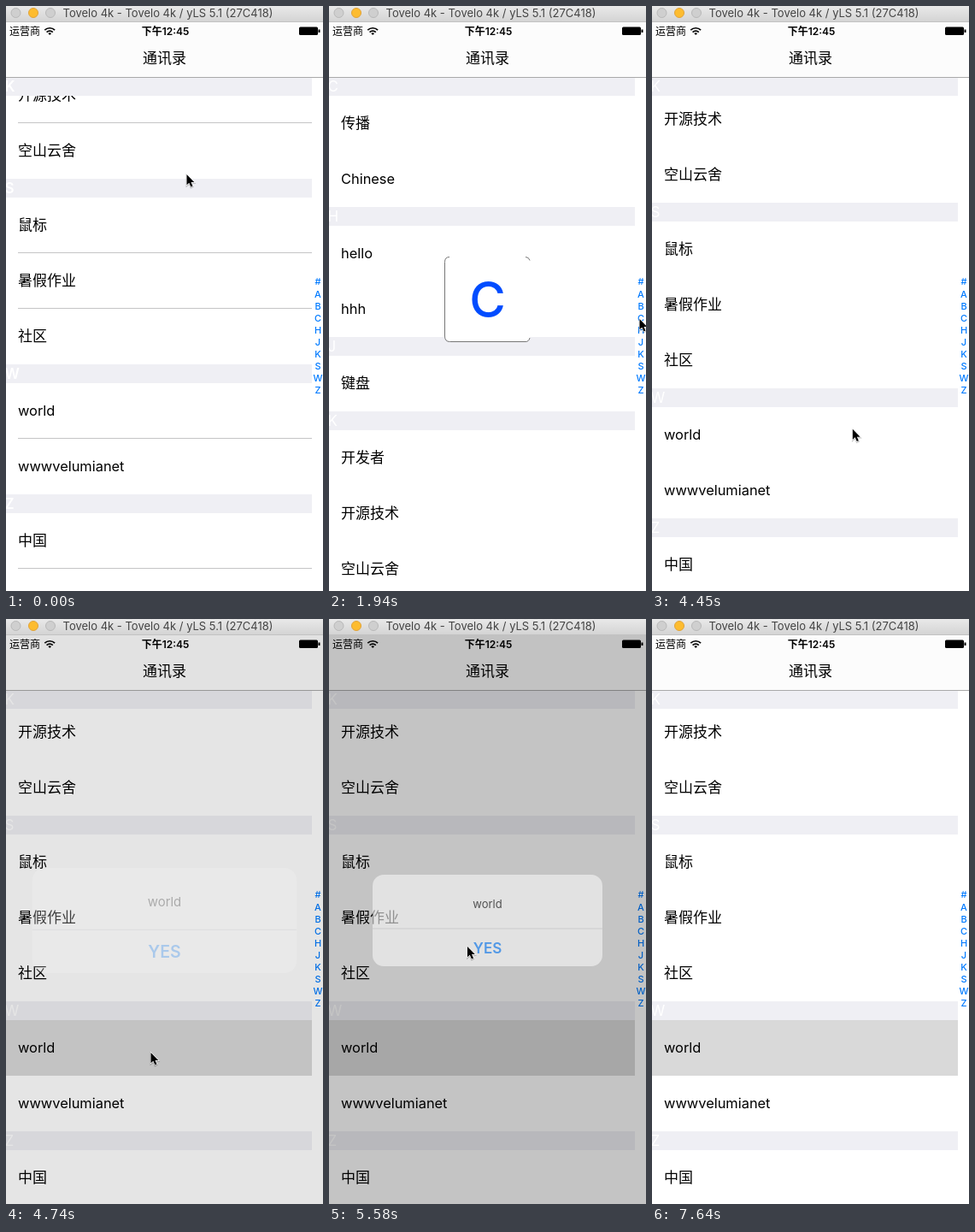
An HTML page that plays this animation: 371 by 684 pixels, repeating every 7.92 s.

```html
<!DOCTYPE html>
<html lang="zh-CN">
<head>
<meta charset="utf-8">
<style>
html, body { margin: 0; width: 100%; height: 100%; overflow: hidden; background: #fff; }
svg { display: block; }
text { font-family: Inter, "Noto Sans CJK SC", "Noto Sans CJK", sans-serif; font-size: 17px; }
.mid { text-anchor: middle; }
.latin { font-size: 16.4px; }
.head rect { fill: #efeff4; }
.head text { fill: #fff; }
.lines { stroke: #c4c4c6; }
.index text { font-size: 11px; font-weight: 500; fill: #007aff; }
</style>
</head>
<body>
<svg width="371" height="684" viewBox="0 0 371 684">
  <defs>
    <linearGradient id="bar" x2="0" y2="1">
      <stop stop-color="#e9e9e9"/><stop offset="1" stop-color="#d4d4d4"/>
    </linearGradient>
    <clipPath id="view"><rect y="83" width="358" height="601"/></clipPath>
  </defs>
  <rect width="371" height="684" fill="#fff"/>
  <g clip-path="url(#view)">
    <g id="rows"></g>
    <g id="heads"></g>
  </g>
  <g class="index mid" id="index"></g>

  <rect y="18" width="371" height="65" fill="#fcfcfc"/>
  <path d="M0 83.5H371" stroke="#a9a9a9"/>
  <text x="4" y="33.5" style="font-size:12px">运营商</text>
  <g fill="none" stroke="#000" stroke-width="1.7">
    <path d="M45.3 28.2a8.3 8.3 0 0 1 11.8 0M47.6 30.6a5 5 0 0 1 7.2 0"/>
    <path d="M51.2 34l-1.9-1.9a2.7 2.7 0 0 1 3.8 0z" fill="#000" stroke="none"/>
  </g>
  <text class="mid" x="186.5" y="33.5" style="font-size:12px;font-weight:600">下午12:45</text>
  <rect x="343" y="24.5" width="22" height="9.5" rx="1.5"/>
  <path d="M365.5 27.5h2v3.5h-2z"/>
  <text class="mid" x="185.5" y="67" style="font-weight:500">通讯录</text>

  <g id="popup">
    <rect x="135.5" y="293" width="100" height="99.5" rx="6" fill="#fff"/>
    <path d="M141 293.5q-5.5 0-5.5 6V386q0 6.5 6 6.5H230q4 0 5-4.5M230 293.5q4 0 5 4" fill="none" stroke="#777"/>
    <text class="mid" id="letter" x="185.5" y="364" style="font-size:58px;font-weight:500" fill="#004cff"></text>
  </g>

  <rect id="dim" y="18" width="371" height="666"/>
  <g id="alert">
    <rect x="-134.5" y="-53.5" width="269" height="107" rx="13" fill="#f8f8f8"/>
    <path d="M-134.5 9.5H134.5" stroke="#d0d0d3"/>
    <text class="mid" y="-14.5" style="font-size:13px">world</text>
    <text class="mid" y="38" style="font-weight:600" fill="#007aff">YES</text>
  </g>

  <rect width="371" height="18" fill="url(#bar)"/>
  <path d="M0 18.5H371" stroke="#c2c2c2"/>
  <g fill="#cfcfcf" stroke="#b9b9b9">
    <circle cx="11.5" cy="8" r="5.5"/>
    <circle cx="32" cy="8" r="5.5" fill="#fdbc2f" stroke="#e0a33a"/>
    <circle cx="52" cy="8" r="5.5"/>
  </g>
  <text x="66.5" y="12.5" style="font-size:13px" fill="#444">Tovelo 4k - Tovelo 4k / yLS 5.1 (27C418)</text>

  <g id="cursor">
    <g transform="translate(-.5 0) scale(.88)">
      <path d="M0 1V15L3.2 12 5.6 17.4 8 16.3 5.7 11.2H10Z" opacity=".25" stroke="#000" stroke-width="2"/>
      <path d="M0 0V14L3.2 11 5.6 16.4 8 15.3 5.7 10.2H10Z" stroke="#fff" stroke-width="1.5" paint-order="stroke"/>
    </g>
  </g>
</svg>
<script>
const $ = id => document.getElementById(id);
const LOOP = 7920, STEP = 146.5, LAST = 52;
const TOP = 83, ROW = 65, HEAD = 22, VIEW = 603;
const sections = [
  ['#', '123'], ['A', '安静'], ['B', '本子'],
  ['C', '传播', 'Chinese'], ['H', 'hello', 'hhh'], ['J', '键盘'],
  ['K', '开发者', '开源技术', '空山云舍'],
  ['S', '鼠标', '暑假作业', '社区'],
  ['W', 'world', 'wwwvelumianet'], ['Z', '中国']
];

// Lay the list out once; scrolling only moves the groups.
let total = 0, rows = '', lines = '', heads = '', index = '';
const tops = sections.map(([name, ...items], s) => {
  const top = total;
  heads += `<g class="head"><rect width="358" height="${HEAD}"/><text x="-1.5" y="17">${name}</text></g>`;
  index += `<text x="365" y="${(s ? 323 + s * 14 : 322) + 4}">${name}</text>`;
  total += HEAD;
  items.forEach((item, i) => {
    if (item === 'world') rows += `<rect id="picked" y="${total}" width="358" height="${ROW}" fill="#d9d9d9"/>`;
    rows += `<text class="${/^\w/.test(item) ? 'latin' : ''}" x="14" y="${total + 37.6}">${item}</text>`;
    total += ROW;
    if (i < items.length - 1 || s === sections.length - 1) lines += `M14 ${total - 0.5}H358`;
  });
  return top;
});
const maxScroll = total - VIEW;
$('rows').innerHTML = rows + `<path class="lines" id="lines" d="${lines}"/>`;
$('heads').innerHTML = heads;
$('index').innerHTML = index;

// step, x, y
const path = [
  [0, 212, 197], [2, 216, 200], [7, 362, 312], [8, 365, 318], [13, 364, 366],
  [22, 367, 447], [23, 366, 452], [27, 366, 470], [28, 366, 470],
  [31, 170, 507], [33, 170, 507], [36, 163, 383], [38, 162.5, 383],
  [39, 162, 378], [43, 141, 175], [44, 139, 162], [45, 138, 153],
  [47, 165, 235], [51, 323, 660], [52, 345, 720]
];
const fadeIn = [0.25, 0.75, 0.95], fadeOut = [0.58, 0.12];

function cursorAt(n) {
  const i = Math.max(1, path.findIndex(p => p[0] >= n));
  const [a, x, y] = path[i - 1], [b, u, v] = path[i];
  const k = (n - a) / (b - a);
  return [x + (u - x) * k, y + (v - y) * k];
}

function alertLevel(n) {
  if (n < 32) return 0;
  return n < 38 ? fadeIn[n - 32] ?? 1 : fadeOut[n - 38] ?? 0;
}

function show(node, on) { node.style.display = on ? '' : 'none'; }

function draw(now) {
  const n = Math.min(LAST, Math.floor(now % LOOP / STEP));
  const [x, y] = cursorAt(n);
  const touching = n >= 8 && n <= 28;
  const pick = Math.max(0, Math.min(9, Math.floor((y - 315) / 14)));
  const bounce = n < 8 ? Math.round(28 * 0.45 ** n) : 0;
  const scroll = touching ? Math.min(tops[pick], maxScroll) : maxScroll + bounce;

  $('rows').setAttribute('transform', `translate(0 ${TOP - scroll})`);
  [...$('heads').children].forEach((head, s) => {
    const next = (tops[s + 1] ?? total) - HEAD;
    const at = Math.min(Math.max(tops[s], scroll), next);
    head.setAttribute('transform', `translate(0 ${TOP + at - scroll})`);
  });
  $('heads').style.fontWeight = bounce ? 600 : 400;
  show($('lines'), bounce);
  show($('picked'), n >= 31);

  show($('popup'), touching);
  $('letter').textContent = sections[pick][0];

  const level = alertLevel(n);
  const scale = n < 38 ? 1.2 - 0.2 * level : 1;
  $('dim').setAttribute('opacity', 0.4 * level);
  $('alert').setAttribute('opacity', level);
  $('alert').setAttribute('transform', `translate(185.5 352.5) scale(${scale})`);
  $('cursor').setAttribute('transform', `translate(${x} ${y})`);
}

const start = performance.now();
(function tick() {
  draw(performance.now() - start);
  requestAnimationFrame(tick);
})();
</script>
</body>
</html>
```
